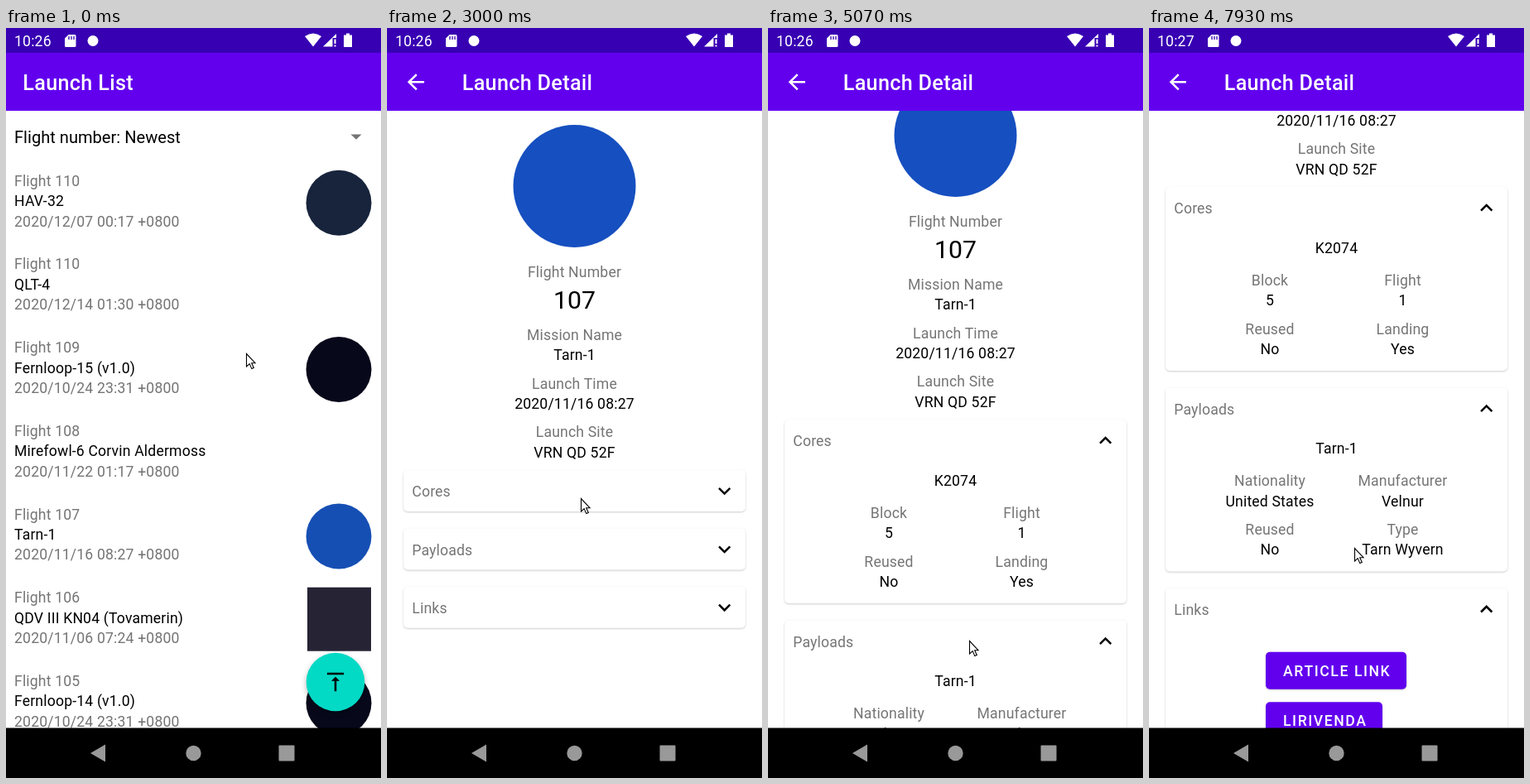
Recreate the animation shown at these times as an HTML page. Size 453 px wide and 906 px high, loop 8 s.

```html
<!DOCTYPE html>
<html lang="en">
<head>
<meta charset="utf-8">
<title>Launch List</title>
<style>
  html, body { margin: 0; height: 100%; overflow: hidden; background: #fff; }
  svg { display: block; width: 100vw; height: 100vh; }
  text { font: 17.62px Roboto, sans-serif; letter-spacing: .17px; white-space: pre; }
  .mid { text-anchor: middle; }
  .grey { fill: #757575; }
  .white { fill: #fff; }
  .title { font-size: 25.2px; font-weight: 500; letter-spacing: .31px; fill: #fff; }
  .spinner { font-size: 20.1px; letter-spacing: 0; }
  .number { font-size: 30.2px; letter-spacing: 0; }
  .button { font-weight: 500; letter-spacing: 1.57px; fill: #fff; }
  .raised { filter: drop-shadow(0 1px 1.2px rgba(0, 0, 0, .2)); }
  .fab { filter: drop-shadow(0 3px 3px rgba(0, 0, 0, .3)); }
</style>
</head>
<body>
<svg id="stage" viewBox="0 0 453 906"></svg>
<script>
const LOOP = 8000;
const DP = 453 / 360;
const ROW = 100.7, LINE = 24.4, FACT_GAP = 58.8;
const CARD_CLOSED = 50, CARD_GROWTH = 172, CARD_PITCH = 70.4, CARDS_TOP = 534;
const SCROLL_END = 836;
const OPEN_DETAIL = 1670;

const progress = (time, from, to) => Math.min(1, Math.max(0, (time - from) / (to - from)));
const ease = p => p * p * (3 - 2 * p);

// Applies each eased move in turn to a starting value.
const follow = (time, first, moves) => moves.reduce(
  (value, { from, to, end }) => value + (end - value) * ease(progress(time, from, to)), first);

const pointerMoves = [
  { from: 130, to: 800, x: 255, y: 616 },
  { from: 2330, to: 2730, x: 239, y: 659 },
  { from: 2810, to: 3000, x: 234, y: 568 },
  { from: 3270, to: 4070, x: 252, y: 666 },
  { from: 4110, to: 4330, x: 252, y: 599, scroll: 61 },
  { from: 4400, to: 4930, x: 243, y: 740 },
  { from: 5425, to: 6225, x: 233, y: 546, scroll: 233 },
  { from: 6300, to: 6670, x: 238, y: 633 },
  { from: 6800, to: 7330, x: 241, y: 813 },
  { from: 7490, to: 7930, x: 248, y: 628, scroll: 342 }
];
const track = key => pointerMoves.filter(move => key in move)
  .map(move => ({ from: move.from, to: move.to, end: move[key] }));
const trackX = track('x'), trackY = track('y'), trackScroll = track('scroll');

const text = (x, y, words, style = '') => `<text x="${x}" y="${y}" class="${style}">${words}</text>`;
const pair = (x, y, label, value) =>
  text(x, y, label, 'mid grey') + text(x, y + LINE, value, 'mid');
const icon = (x, y, path, fill) =>
  `<path transform="translate(${x} ${y}) scale(${DP}) translate(-12 -12)" d="${path}" fill="${fill}"/>`;
const circle = (x, y, r, fill) => `<circle cx="${x}" cy="${y}" r="${r}" fill="${fill}"/>`;
const rect = (x, y, w, h, fill, extra = '') =>
  `<rect x="${x}" y="${y}" width="${w}" height="${h}" fill="${fill}" ${extra}/>`;

const disc = fill => y => circle(402, y, 39.5, fill);
const tile = fill => y => rect(364, y - 39, 77, 77, fill);
const noBadge = () => '';

const launches = [
  ['Flight 110', 'HAV-32', '2020/12/07 00:17', disc('#17243c')],
  ['Flight 110', 'QLT-4', '2020/12/14 01:30', noBadge],
  ['Flight 109', 'Fernloop-15 (v1.0)', '2020/10/24 23:31', disc('#07081a')],
  ['Flight 108', 'Mirefowl-6 Corvin Aldermoss', '2020/11/22 01:17', noBadge],
  ['Flight 107', 'Tarn-1', '2020/11/16 08:27', disc('#164fb4')],
  ['Flight 106', 'QDV III KN04 (Tovamerin)', '2020/11/06 07:24', tile('#262334')],
  ['Flight 105', 'Fernloop-14 (v1.0)', '2020/10/24 23:31', disc('#07081a')]
];

const listView = text(10, 138.5, 'Flight number: Newest', 'spinner') +
  '<path d="M416.5 128.5h13l-6.5 6.3z" fill="#757575"/>' +
  launches.map(([flight, name, date, badge], i) => {
    const y = 190.7 + ROW * i;
    return text(10, y, flight, 'grey') + text(10, y + LINE, name) +
      text(10, y + 2 * LINE, date + ' +0800', 'grey') + badge(y + 20.5);
  }).join('') +
  rect(0, 563, 453, ROW, '#000', 'id="ripple" opacity=".1"') +
  `<g class="fab">${circle(398, 790, 35.3, '#03dac5')}</g>` +
  icon(398, 790, 'M8 11h3v10h2V11h3l-4-4-4 4zM4 3v2h16V3H4z', '#000');

// Card contents are placed relative to the card's top left corner.
const facts = (heading, cells) => text(206.5, 79.7, heading, 'mid') +
  cells.map(([label, value], i) =>
    pair(i % 2 ? 286.5 : 126, 118.8 + FACT_GAP * (i >> 1), label, value)).join('');
const button = (y, width, label) =>
  rect(121, y, width, 45, '#6200ee', 'rx="5" class="raised"') + text(142, y + 29, label, 'button');

const cards = [
  { name: 'Cores', opens: 3270, body: facts('K2074',
    [['Block', '5'], ['Flight', '1'], ['Reused', 'No'], ['Landing', 'Yes']]) },
  { name: 'Payloads', opens: 5000, body: facts('Tarn-1',
    [['Nationality', 'United States'], ['Manufacturer', 'Velnur'],
     ['Reused', 'No'], ['Type', 'Tarn Wyvern']]) },
  { name: 'Links', opens: 7470,
    body: button(77, 170, 'ARTICLE LINK') + button(137.5, 141, 'LIRIVENDA') }
];

const summary = [
  ['Mission Name', 'Tarn-1'], ['Launch Time', '2020/11/16 08:27'], ['Launch Site', 'VRN QD 52F']
];

const detailView = `<g id="patch">${circle(226.5, 191, 74, '#164fc0')}</g>` +
  text(226.5, 301.4, 'Flight Number', 'mid grey') + text(226.5, 339.2, '107', 'mid number') +
  summary.map(([label, value], i) => pair(226.5, 376.8 + FACT_GAP * i, label, value)).join('') +
  cards.map(({ name, body }) => `<g class="card">
    ${rect(0, 0, 413, CARD_CLOSED, '#fff', 'rx="5" class="raised"')}
    ${text(10.3, 32.4, name, 'grey')}
    <g class="chevron">${icon(0, 0, 'M16.59 8.59L12 13.17 7.41 8.59 6 10l6 6 6-6z', '#000')}</g>
    <g class="body">${body}</g></g>`).join('');

const statusBar = rect(0, 0, 453, 30, '#3700b3') +
  '<text id="clock" x="10" y="22" class="white"></text>' +
  `<path d="M75.5 8H83q1.5 0 1.5 1.5v12q0 1.5-1.5 1.5H72.5q-1.5 0-1.5-1.5V12.5z
    M371 22.5L361 10q10-7 20 0z M383 22.5L399 7v5h-4.5v10.5z
    M396.5 13.5h2v5.5h-2z M396.5 20.5h2v2h-2z M408 8.5h3V6.5h4v2h3V23h-10z" fill="#fff"/>
  <path d="M76 10v4m3-4v4m3-4v4" stroke="#3700b3" stroke-width="1.3"/>` +
  circle(105, 15.5, 6.5, '#fff');

const toolbar = rect(0, 30, 453, 70, '#6200ee') +
  `<g id="listBar">${text(20.3, 75, 'Launch List', 'title')}</g>
  <g id="detailBar">${icon(34.8, 65.2,
    'M20 11H7.83l5.59-5.59L12 4l-8 8 8 8 1.41-1.41L7.83 13H20z', '#fff')}
  ${text(90.7, 75, 'Launch Detail', 'title')}</g>`;

const navBar = rect(0, 845.5, 453, 60.5, '#000') +
  '<path d="M102 876l18-10.5v21z" fill="#999"/>' +
  circle(226.5, 876, 9.2, '#999') + rect(329.5, 866.5, 19, 19, '#999', 'rx="1"');

const stage = document.getElementById('stage');
stage.innerHTML = `<g id="list">${listView}</g><g id="detail">${detailView}</g>` +
  statusBar + toolbar + navBar +
  `<path id="cursor" d="M.5.5V16l3.7-3.4 2.6 6 2.5-1.1-2.6-5.8H11z"
    fill="#fff" stroke="#000" stroke-width="1.1"/>`;

const byId = id => document.getElementById(id);
const show = (node, visible) => node.setAttribute('display', visible ? 'inline' : 'none');
const place = (node, transform) => node.setAttribute('transform', transform);
const cardNodes = [...stage.querySelectorAll('.card')];

function layoutCards(time) {
  let top = CARDS_TOP;
  cards.forEach((card, i) => {
    const node = cardNodes[i], open = time >= card.opens;
    const growth = open ? CARD_GROWTH : 0;
    place(node, `translate(20 ${top})`);
    node.querySelector('rect').setAttribute('height', CARD_CLOSED + growth);
    place(node.querySelector('.chevron'), `translate(387.7 25.3) scale(1 ${open ? -1 : 1})`);
    show(node.querySelector('.body'), open);
    top += CARD_PITCH + growth;
  });
}

function draw(time) {
  const inDetail = time >= OPEN_DETAIL;
  ['list', 'listBar'].forEach(id => show(byId(id), !inDetail));
  ['detail', 'detailBar'].forEach(id => show(byId(id), inDetail));
  show(byId('ripple'), time >= 1600);
  byId('patch').setAttribute('opacity', progress(time, OPEN_DETAIL, 1800));
  byId('clock').textContent = time < 7000 ? '10:26' : '10:27';

  layoutCards(time);
  const scroll = follow(time, 0, trackScroll);
  // The page stretches briefly when the first drag runs past its end.
  const stretch = 1 + .014 * Math.sin(Math.PI * progress(time, 4230, 4530));
  place(byId('detail'),
    `translate(0 ${SCROLL_END}) scale(1 ${stretch}) translate(0 ${-SCROLL_END - scroll})`);
  place(byId('cursor'), `translate(${follow(time, 290, trackX)} ${follow(time, 393, trackY)})`);
}

const start = performance.now();
function tick() {
  draw((performance.now() - start) % LOOP);
  requestAnimationFrame(tick);
}
tick();
</script>
</body>
</html>
```
